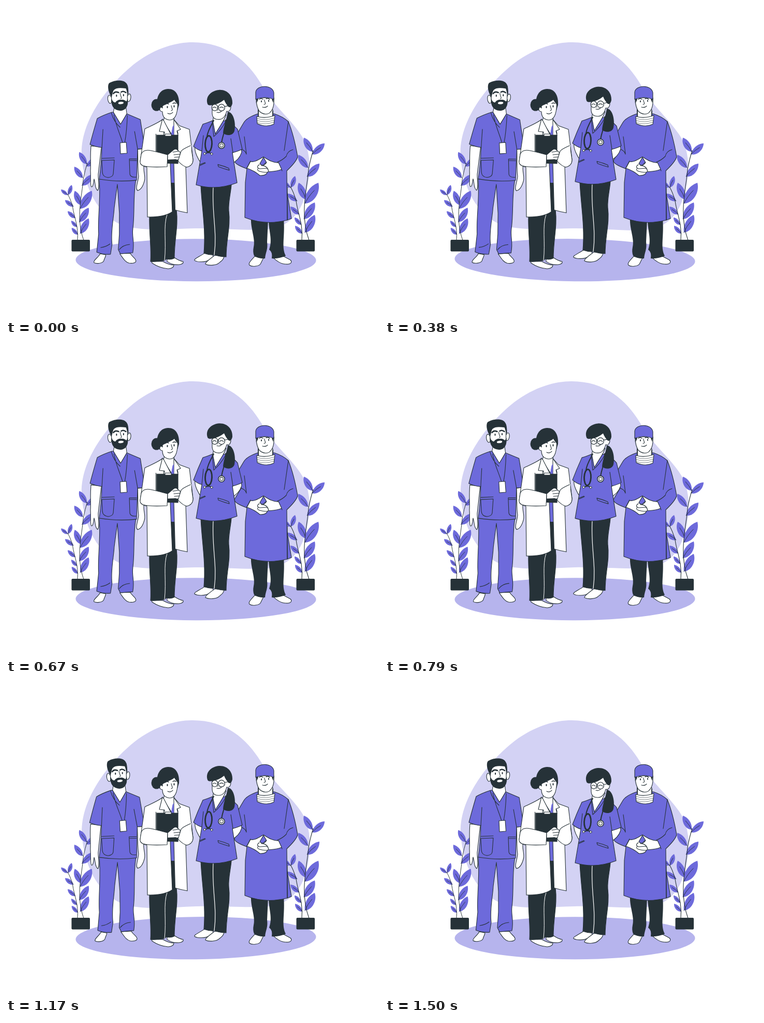
Recreate the animation shown at these times as an HTML page with a canvas. Size 720x600 px, loop 1540 ms.

```html
<!DOCTYPE html>
<html lang="en">
<head>
<meta charset="utf-8">
<title>Medical team</title>
<style>
html, body { margin: 0; width: 100%; height: 100%; overflow: hidden; background: #fff; }
canvas { display: block; }
</style>
</head>
<body>
<canvas id="stage" width="720" height="600"></canvas>
<script>
const ctx = document.getElementById('stage').getContext('2d');
const LOOP = 1540, LEAD = 45;
const PURPLE = '#6d6adb', PALE = '#d3d2f4', FLOOR = '#b6b4ed', DARK = '#263238', WHITE = '#fff';

// Shape helpers
function fill(d, color) {
  ctx.fillStyle = color;
  ctx.fill(new Path2D(d));
}
function line(d, width = 1.1, color = DARK) {
  ctx.lineWidth = width;
  ctx.strokeStyle = color;
  ctx.stroke(new Path2D(d));
}
function part(d, color) {
  fill(d, color);
  line(d);
}
function oval(x, y, rx, ry, color, width = 0, angle = 0) {
  ctx.beginPath();
  ctx.ellipse(x, y, rx, ry, angle, 0, Math.PI * 2);
  if (color) { ctx.fillStyle = color; ctx.fill(); }
  if (width) { ctx.lineWidth = width; ctx.strokeStyle = DARK; ctx.stroke(); }
}
function turned(x, y, angle, draw) {
  ctx.save();
  ctx.translate(x, y);
  ctx.rotate(angle);
  ctx.translate(-x, -y);
  draw();
  ctx.restore();
}

function backdrop() {
  fill('M360 70C425 70 466 106 493 151C516 192 546 214 568 246C592 280 590 332 574 376C562 410 534 430 500 431C460 433 410 428 365 429C320 430 275 435 235 426C190 415 150 365 146 285C145 215 205 145 250 110C290 80 330 70 360 70Z', PALE);
}

// Leaves run from base to tip
const leaves = [
  [592, 281, 575, 254], [591, 286, 615, 265], [583, 312, 564, 287], [581, 329, 605, 304],
  [579, 373, 565, 341], [577, 381, 603, 341], [575, 411, 596, 379], [577, 437, 596, 403],
  [549, 350, 534, 338], [550, 350, 558, 328], [562, 376, 543, 362], [566, 402, 549, 387],
  [570, 422, 557, 408], [572, 439, 558, 424]
];
function leaf([x, y, tx, ty]) {
  const dx = tx - x, dy = ty - y, side = tx > x ? 1 : -1;
  const at = (a, s) => `${x + dx * a - dy * s * side} ${y + dy * a + dx * s * side}`;
  fill(`M${x} ${y}C${at(.2, .3)} ${at(.72, .3)} ${tx} ${ty}C${at(.72, -.22)} ${at(.3, -.24)} ${x} ${y}Z`, PURPLE);
  line(`M${x} ${y}Q${at(.35, -.04)} ${at(.65, .03)}`, .9);
}
function plant(x, scale) {
  ctx.save();
  ctx.translate(x, 452);
  ctx.scale(scale, scale);
  ctx.translate(-578, -452);
  leaves.forEach(leaf);
  line('M585 452C566 400 582 350 584 315Q588 294 593 279M571 452C574 420 563 400 560 376Q555 358 549 349');
  ctx.restore();
  ctx.fillStyle = DARK;
  ctx.beginPath();
  ctx.roundRect(x - 17.5, 451, 35.5, 22.5, 2);
  ctx.fill();
}

function beardedMan() {
  part('M164 270C162 290 164 305 163 318C164 330 162 347 165 349C168 350 169 341 170 334C173 342 171 352 177 356C181 352 178 338 178 325L184 272Z', WHITE);
  part('M254 276C255 300 254 318 256 328C255 340 249 352 254 356C259 355 264 349 267 338C270 330 265 320 266 310L266 275Z', WHITE);
  part('M182 478C178 486 169 490 170 495C174 498 186 497 189 492C190 487 193 484 193 480Z', WHITE);
  part('M220 478C226 486 230 494 238 496C246 497 252 495 251 491C250 486 243 483 240 477Z', WHITE);
  part('M180 334C183 375 177 410 179 440L175.5 475Q188 480 202 479L205 460C202 435 208 410 209 390L215 344L219 400L219 440L217 470L221 478L245 476C249 455 243 445 245 430C249 400 245 365 251 334Z', PURPLE);
  line('M183 466Q193 465 201 459M219 470Q226 461 239 460');
  part('M209 194L207 205L221 229L233 208L231 194Z', WHITE);
  part('M204 205Q186 211 176 217Q168 244 162 267Q173 272 185 273C184 300 182 320 180 334Q215 340 252 336L254 276L268 275L259 219L233 208L221 228L207 205Z', PURPLE);
  line('M187 238L185 273M248 242L254 276M203 206Q208 224 220 234M208 210C213 235 221 249 225 264M234 211Q233 242 229 264');
  line('M185 294L209 293M185 298L209 297L207 324Q206 330 197 331Q187 330 186 321ZM252 295H238L239 324Q240 331 251 330M239 298H252');
  part('M220 264L232 263L233.5 284L221 285Z', WHITE);

  oval(200, 180, 3.8, 8, WHITE, 1.1, -.15);
  oval(237, 177, 3.5, 7.5, WHITE, 1.1, .15);
  part('M204 156C202 180 203 194 212 199C222 203 233 198 234 188L234 154Z', WHITE);
  fill('M203 178C206 185 208 186 211 186C213 182 219 180 222 181C227 180 229 182 232 184L235 179C236 195 230 202 220 202C208 201 202 193 203 178Z', DARK);
  oval(221.5, 187, 5.2, 2.3, WHITE, 0, -.1);
  fill('M202 173C196 164 195 150 200 148C211 142 227 142 232 149C236 154 236 162 236 171C233 168 233 163 231 159C222 158 213 157 208 162C205 166 206 170 203 177Z', DARK);
  oval(213, 173, 1.1, 2.2, DARK);
  oval(226.5, 172, 1.1, 2.2, DARK);
  line('M207 169Q210 164 217 167M222 166Q226 163 231 167', 2.5);
  line('M220 168C220 174 225 178 221 179');
}

function coatWoman() {
  part('M311 487L326 486Q335 492 342 493Q343 498 334 499C322 500 316 496 311 493Z', WHITE);
  part('M281 492L303 493Q313 499 324 500Q324 506 313 507C298 506 288 500 282 496Z', WHITE);
  part('M277 403C276 440 281 465 279 493Q292 494 306 491L309 488Q320 490 325 486C325 450 333 425 329 393Z', DARK);
  line('M311 402C303 425 310 455 306 491', 1, WHITE);
  fill('M302 219L325 219L337 245L324 342H317L300 245Z', PURPLE);
  fill('M318 341H326V395L318 401Z', DARK);
  part('M302 219C290 228 275 233 268 237L259 300Q261 309 272 311L273 407Q305 408 321 397L317 304L305 246Z', WHITE);
  part('M325 220L335 231L354 238L361 296Q360 309 347 311L350 399Q338 397 326.5 393.5L324 304L332 246Z', WHITE);
  part('M306 211L304 223L320 248L325 228L324 212Z', WHITE);
  part('M302 218L296 242L306 243L304 250L319 249L305 222Z', WHITE);
  part('M324 219L337 238L330 241L332 250H324Z', WHITE);
  fill('M321.5 233L324 229V249H318.5Z', PURPLE);
  part('M291 249H332V304L291 303Z', DARK);
  line('M289.5 247V285', 1.2);
  part('M307 247H319V251H307Z', WHITE);
  part('M261 286C267 272 283 280 312 287L311 310Q278 312 264 308Q258 305 259 299Z', WHITE);
  part('M312 287L324 277Q329 274 332 279Q338 282 336 286L337 293Q333 299 327 296L312 297Z', WHITE);
  line('M322 282L333 280M324 287L336 286M325 292L336 291');
  part('M357 269Q341 276 338 280L332 299Q341 309 349 311Q361 308 361 297Z', WHITE);
  line('M357 269V277', 1.4, WHITE);

  oval(290.5, 191, 10, 11.5, DARK);
  fill('M292 193C289 174 298 160 313 160C328 160 335 173 334 191L331 201L303 204Q294 203 292 193Z', DARK);
  part('M302 193C307 188 319 186 325 180C328 186 331 188 331.5 190C331 207 327 220 316 220C305 219 302 212 302 204Q296 203 297 198Q299 193 302 197Z', WHITE);
  oval(311.5, 195, 1.1, 2.2, DARK);
  oval(324.5, 193.5, 1.1, 2.2, DARK);
  line('M307 190Q310 187 314 189M322 188Q325 186 328 188', 1.5);
  line('M319 192C319 197 324 200 319 202M312 207Q318 210 322 205');
}

function stethoscopeWoman() {
  part('M365 272C363 281 371 296 378 306L381 278Z', WHITE);
  part('M437 283L434 305Q450 298 455 282L454 275Z', WHITE);
  part('M383 477C375 483 362 488 364 491C370 495 385 494 390 491L400 486L399 479Z', WHITE);
  part('M403 481C397 486 384 494 385 498C392 502 407 500 411 496C417 491 420 489 421 483Z', WHITE);
  part('M376 345C378 390 386 430 382 477Q393 481 403 480Q413 484 425 484C425 450 434 425 430 395C429 378 434 360 435 345Z', DARK);
  line('M400 350C397 400 408 435 402 480', 1.2, WHITE);
  part('M401 211L399 223L404 250L419 223L425 210Z', WHITE);
  part('M399 221Q387 226 380 228Q370 250 362 271Q370 278 378 280L367 345Q405 357 446 341L437 283Q449 280 456 276L447 238Q438 227 420 221L404 247Z', PURPLE);
  line('M381 250L378 280M434 256L438 283M398 222L401 252Q415 240 424 223');
  line('M374 308L385 303M374 306L384 302M409 306Q421 309 430 313L431 317Q420 314 410 310Z');

  line('M401 221C395 232 389 242 388 252', 2);
  oval(391, 266, 6.5, 15.5, null, 2.8, .04);
  line('M424 220C425 240 419 245 416 264', 2);
  oval(416, 269, 6, 6, WHITE, 1.5);
  oval(416, 269, 3.2, 3.2, WHITE, 1.1);
  line('M384 285Q391 281 397 285', 1.8);
  oval(383.5, 285, 2, 2, WHITE, 1);
  oval(397, 285.5, 2, 2, WHITE, 1);

  fill('M428 204C440 205 444 227 441 241C438 251 425 251 419 245C420 232 426 219 428 204Z', DARK);
  part('M398 183L398 203C397 216 403 219 411 219C421 219 425 208 426 203Q433 205 434 195Q432 191 429 193L425 180Z', WHITE);
  fill('M389 189C384 173 398 163 411 162C428 161 438 174 437 188Q435 197 430 195Q424 189 421 181Q410 190 398 191Q391 193 389 189Z', DARK);
  oval(403, 196, 5.8, 6.3, WHITE, 1.2);
  oval(416, 196, 6.4, 6.5, WHITE, 1.2);
  line('M422 194L432 192M399 197Q402 193 406 197M412 197Q416 193 420 197M409 195Q409 193 410 195');
  line('M407 205Q413 207 416 203');
  line('M409 197Q406 201 409 202', .9);
}

function surgeon() {
  part('M480 483C474 490 467 496 470 500C475 504 488 502 491 498L497 486Z', WHITE);
  part('M516 486C522 491 530 498 540 498C550 499 553 494 549 490L536 483Z', WHITE);
  fill('M473 410C472 430 482 450 478 465Q476 475 479 482Q487 488 500 487C501 475 506 470 504 455L506 412Z', DARK);
  fill('M507 412C507 435 515 450 508 470Q515 475 513 487Q527 488 540 482C531 465 539 445 536 410Z', DARK);
  part('M541 350L551 410L543 413Z', PURPLE);
  part('M486 208Q465 215 459 225L446 247Q449 263 454 276L441 298Q440 305 465 314L462 340L461 408Q500 424 543 413L542 318Q560 301 563 291Q556 250 545 223Q534 213 518 208Z', PURPLE);
  line('M460 252L464 285M454 276Q463 280 464 286M472 299L464 314M545 223L537 279M543 350L543 412M554 277Q543 280 541 290Q533 298 524 301L533 318');
  part('M472 300C480 302 488 296 497 291C505 296 515 303 526 302L532 315C525 319 515 319 505 320Q502 328 490 327Q480 318 465 313Z', WHITE);
  part('M497 292L503 302Q499 308 493 307L490 304Z', PURPLE);
  line('M489 306Q482 311 489 314L505 313M486 314Q483 320 504 321M502 302L496 308M493 308Q504 307 507 319');

  part('M487 200H515V214L517 222L487 222Z', WHITE);
  line('M487 198V213M515 203V212', 1.8);
  part('M484 213Q501 218 519 211L517 228Q502 235 485 227Z', WHITE);
  line('M485 217Q501 222 518 216M485 221Q501 226 518 220M485 225Q501 230 517 224', .6);
  part('M483 177C482 190 487 200 489 203C496 210 506 210 510 205C515 200 518 190 517 177Z', WHITE);
  fill('M482 176L487 180L484 187ZM517 176L513 180L516 187Z', DARK);
  part('M482 180L482 166C484 152 514 151 517 167V180Q500 173 482 180Z', PURPLE);
  oval(493, 184, 1, 1.9, DARK);
  oval(507, 183, 1, 1.9, DARK);
  line('M489 180Q492 177 496 180M502 179Q506 177 509 180', 1.4);
  line('M499 181C498 185 504 189 498 190M495 195Q501 197 505 193');
}

function render(now) {
  const phase = (now % LOOP + LEAD) / LOOP * Math.PI * 2;
  const tilt = Math.sin(phase) * .0115;
  const lift = (1 - Math.cos(phase)) * 5.4;

  ctx.fillStyle = WHITE;
  ctx.fillRect(0, 0, 720, 600);
  ctx.lineCap = ctx.lineJoin = 'round';
  turned(365, 255, tilt, backdrop);
  oval(366.5, 490.2, 232, 41, FLOOR, 0, tilt);
  plant(144, .86);
  plant(578, 1);
  turned(213, 330, tilt, beardedMan);
  coatWoman();
  surgeon();
  ctx.save();
  ctx.translate(0, -lift);
  stethoscopeWoman();
  ctx.restore();
}

const start = performance.now();
function tick() {
  render(performance.now() - start);
  requestAnimationFrame(tick);
}
tick();
</script>
</body>
</html>
```
